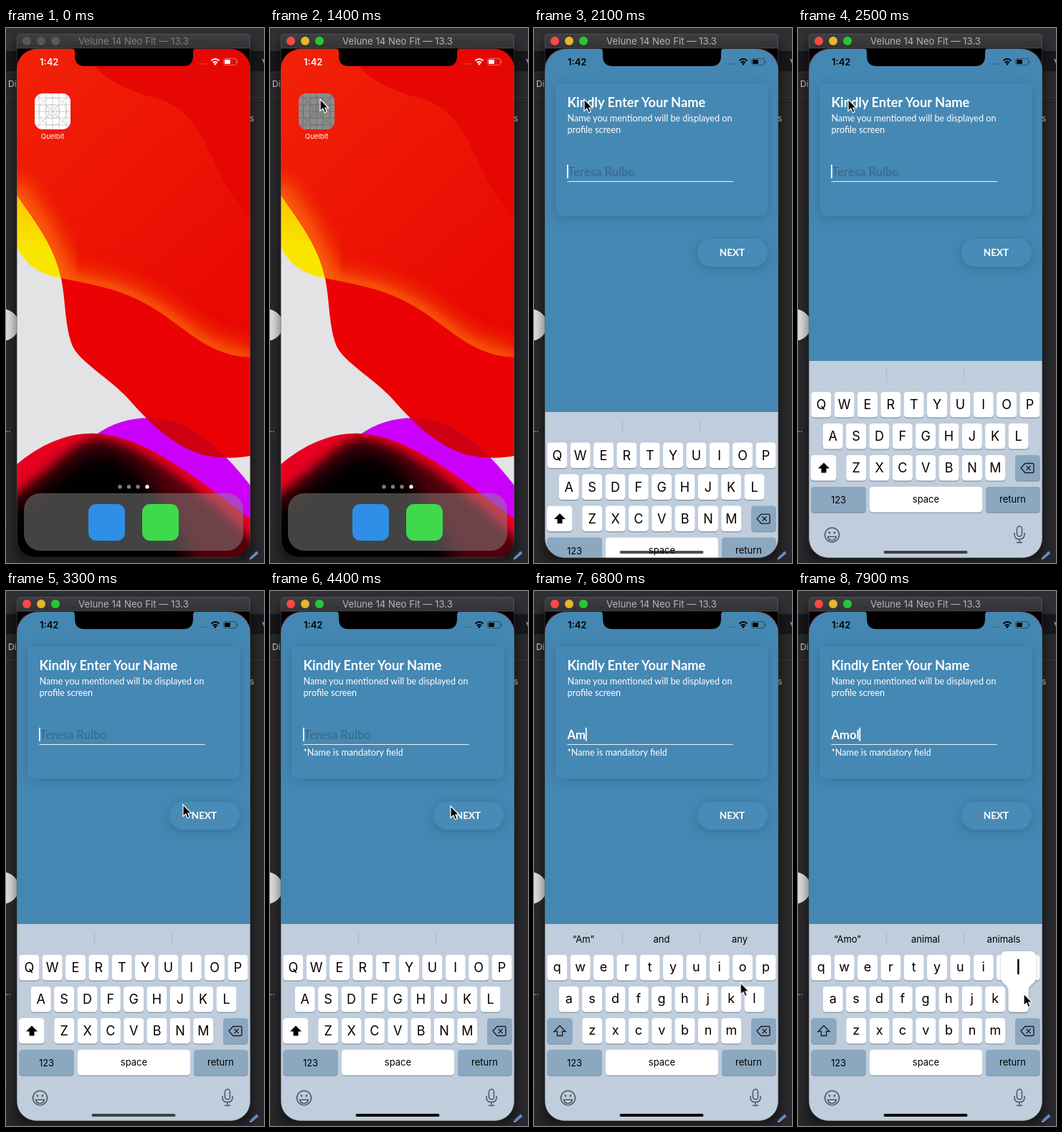
An HTML page for the animation above (8 s loop, 360 by 744 pixels).

```html
<!DOCTYPE html>
<html lang="en">
<head>
<meta charset="utf-8">
<title>Name entry</title>
<style>
html, body { margin: 0; width: 100%; height: 100%; overflow: hidden; background: #29292d; }
svg { display: block; width: 100vw; height: 100vh; }
text { font-family: Inter, sans-serif; }
.form text { font-family: Lato, sans-serif; fill: #fff; }
.mid { text-anchor: middle; }
.bold { font-weight: 700; }

.wall, .icons, .dim, .app, .form, .splash, .keyboard, .homebar, .pointer {
  animation: 8s linear infinite;
}
.wall { animation-name: wall; transform-origin: 178px 383px; }
.icons { animation-name: icons; }
.dim { animation-name: dim; }
.app { animation-name: launch; transform-origin: 15px 29px; }
.splash { animation-name: splash; }
.form { animation-name: form; }
.keyboard { animation-name: rise; }
.homebar { animation-name: homebar; }
.pointer { animation-name: point; animation-timing-function: ease-in-out; }

@keyframes wall {
  0%, 17.6% { filter: blur(0); transform: none; }
  20%, 100% { filter: blur(12px); transform: scale(1.12, 1.05); }
}
@keyframes icons { 0%, 17.6% { opacity: 1; } 19.6%, 100% { opacity: 0; } }
@keyframes dim { 0%, 17.6% { opacity: 0; } 20%, 100% { opacity: .55; } }
@keyframes launch {
  0%, 17.6% { opacity: 0; transform: translate(25px, 62px) scale(.153, .071); }
  18.2% { opacity: 1; }
  18.75% { opacity: 1; transform: translate(12px, 38px) scale(.6, .52); }
  20% { opacity: 1; transform: translate(2px, 16px) scale(.936, .898); }
  21.25% { opacity: 1; transform: translate(0, 4px) scale(.99, .98); }
  22.5%, 100% { opacity: 1; transform: none; }
}
@keyframes splash { 0%, 21.5% { opacity: 1; } 24%, 100% { opacity: 0; } }
@keyframes form { 0%, 21.5% { opacity: 0; } 24%, 100% { opacity: 1; } }
@keyframes rise {
  0%, 23.75% { transform: translateY(290px); }
  25% { transform: translateY(160px); }
  26.25% { transform: translateY(71px); }
  27.5% { transform: translateY(25px); }
  28.75% { transform: translateY(6px); }
  30%, 100% { transform: none; }
}
@keyframes homebar {
  0%, 21.25% { opacity: 0; }
  23.75%, 41.5% { opacity: .68; }
  47%, 100% { opacity: 1; }
}
@keyframes point {
  0%, 2% { transform: translate(372px, 700px); }
  13.5%, 33.5% { transform: translate(70px, 99px); }
  37.5%, 50% { transform: translate(247px, 297px); }
  54%, 57.7% { transform: translate(252px, 299px); }
  68%, 71.5% { transform: translate(51px, 567px); }
  78%, 82.6% { transform: translate(277px, 606px); }
  86.5%, 91.5% { transform: translate(293px, 518px); }
  96.5%, 100% { transform: translate(315px, 560px); }
}
</style>
</head>
<body>
<svg viewBox="0 0 360 744" preserveAspectRatio="none">
  <defs>
    <filter id="soft" x="-30%" y="-30%" width="160%" height="160%"><feGaussianBlur stdDeviation="7"/></filter>
    <filter id="wide" x="-30%" y="-30%" width="160%" height="160%"><feGaussianBlur stdDeviation="14"/></filter>
    <path id="sheet" d="M15 29V232C45 275 68 305 77 348C84 383 82 425 96 448C113 471 145 488 171 516C205 555 235 580 270 592C300 600 325 598 341 595V29Z"/>
    <path id="fold" d="M15 29V305C28 330 48 343 78 348C120 357 160 362 203 388C248 414 280 456 341 458V29Z"/>
    <path id="foldEdge" d="M15 305C28 330 48 343 78 348C120 357 160 362 203 388C248 414 280 456 345 458"/>
    <path id="swell" d="M125 566C160 540 205 537 240 549C280 565 312 600 341 636V740H125Z"/>
    <path id="hill" d="M15 607C50 577 90 562 126 564C195 568 265 625 341 683V740H15Z"/>
    <clipPath id="screen"><rect x="15" y="29" width="326" height="708" rx="28"/></clipPath>
    <clipPath id="inSheet"><use href="#sheet"/></clipPath>
    <clipPath id="inFold"><use href="#fold"/></clipPath>
    <clipPath id="inHill"><use href="#hill"/></clipPath>
    <clipPath id="inIcon"><rect x="40" y="91" width="50" height="50" rx="11"/></clipPath>
    <linearGradient id="bar" x2="0" y2="1"><stop stop-color="#3f3e41"/><stop offset="1" stop-color="#333235"/></linearGradient>
    <linearGradient id="yellow" x2="0" y2="1"><stop offset=".47" stop-color="#ffc400"/><stop offset=".65" stop-color="#f9e600"/></linearGradient>
    <linearGradient id="red" x2=".7" y2="1"><stop stop-color="#f22208"/><stop offset="1" stop-color="#e90802"/></linearGradient>
    <g id="status">
      <text x="47" y="51.5" font-size="13" font-weight="600" fill="currentColor">1:42</text>
      <g fill="currentColor" opacity=".25">
        <circle cx="268" cy="50" r="1.1"/><circle cx="272" cy="50" r="1.1"/><circle cx="276" cy="50" r="1.1"/><circle cx="280" cy="50" r="1.1"/>
      </g>
      <path d="M286.5 45.5Q292 40.5 297.5 45.5M289 48.2Q292 45.6 295 48.2" fill="none" stroke="currentColor" stroke-width="2"/>
      <path d="M290 49.6Q292 48 294 49.6L292 52Z" fill="currentColor"/>
      <rect x="303.5" y="42.5" width="18" height="9" rx="2.6" fill="none" stroke="currentColor" opacity=".4"/>
      <rect x="305" y="44" width="8" height="6" rx="1.2" fill="currentColor"/>
      <path d="M323 45.5v3" stroke="currentColor" opacity=".4"/>
    </g>
  </defs>

  <!-- Desktop behind the window -->
  <rect width="360" height="744" fill="#29292d"/>
  <rect width="360" height="32" fill="#303034"/>
  <rect y="32" width="360" height="28" fill="#18181b"/>
  <path d="M0 96.5H360" stroke="#3a3a3e"/>
  <path d="M357 42l3 2v6Z" fill="#9b7cf0"/>
  <g fill="#d8d8da" font-size="12">
    <text x="3" y="82">Di</text><text x="340" y="130">s</text>
    <text x="-4" y="562">...</text><text x="-2" y="690">:</text>
  </g>
  <circle cx="-4" cy="413" r="22" fill="#dededf"/>
  <path d="M342 737l9-8" stroke="#6f97d6" stroke-width="4"/>
  <path d="M340 738.5l2.5-1.5" stroke="#c5d3ea" stroke-width="2"/>
  <rect x="12" y="14" width="332" height="728" rx="16" opacity=".45" filter="url(#soft)"/>

  <!-- Window -->
  <path d="M15 28H341V709Q341 737 313 737H43Q15 737 15 709Z"/>
  <path d="M15.5 28V13Q15.5 8.5 20 8.5H336Q340.5 8.5 340.5 13V28Z" fill="url(#bar)" stroke="#555458" stroke-width=".8"/>
  <g id="idle">
    <g fill="#59585b"><circle cx="29" cy="18" r="6"/><circle cx="49" cy="18" r="6"/><circle cx="69" cy="18" r="6"/></g>
    <text class="mid" x="178" y="23" font-size="13.2" fill="#7f7e82">Velune 14 Neo Fit — 13.3</text>
  </g>
  <g id="active">
    <circle cx="29" cy="18" r="6" fill="#fb4a44"/><circle cx="49" cy="18" r="6" fill="#e4b62f"/><circle cx="69" cy="18" r="6" fill="#28c732"/>
    <text class="mid" x="178" y="23" font-size="13.2" fill="#b4b3b7">Velune 14 Neo Fit — 13.3</text>
  </g>

  <g clip-path="url(#screen)">
    <g class="wall">
      <rect x="15" y="29" width="326" height="708" fill="#e3e3e5"/>
      <use href="#swell" fill="#cb00fb"/>
      <use href="#fold" fill="url(#yellow)"/>
      <use href="#sheet" fill="#eb0205"/>
      <g clip-path="url(#inSheet)">
        <use href="#swell" fill="#cf0014"/>
        <g clip-path="url(#inFold)">
          <use href="#fold" fill="url(#red)"/>
          <g fill="none" stroke="#ff7a0c">
            <use href="#foldEdge" stroke-width="30" opacity=".6" filter="url(#wide)"/>
            <use href="#foldEdge" stroke-width="7" opacity=".8" filter="url(#soft)"/>
            <path d="M5 218L15 232C45 275 68 305 77 348" stroke-width="34" opacity=".8" filter="url(#wide)"/>
          </g>
          <path d="M105 29C130 70 165 86 217 100C286 123 285 215 341 260V29Z" fill="#e60703"/>
        </g>
      </g>
      <use href="#hill" fill="#e80020"/>
      <g clip-path="url(#inHill)">
        <path d="M-20 668C50 636 85 578 126 570C195 580 265 640 350 716V770H-20Z" opacity=".65" filter="url(#soft)"/>
        <path d="M-20 680C50 650 85 594 130 586C185 592 215 640 270 770H-20Z" filter="url(#wide)"/>
      </g>
    </g>
    <rect class="dim" x="15" y="29" width="326" height="708"/>

    <g class="icons">
      <use href="#status" color="#fff"/>
      <rect x="40" y="91" width="50" height="50" rx="11" fill="#fff"/>
      <g clip-path="url(#inIcon)" fill="none" stroke="#b4b4b6" stroke-width=".6">
        <path d="M40 91l50 50M90 91l-50 50M65 91v50M40 116h50M46 91v50M84 91v50M40 97h50M40 135h50M56 91v50M74 91v50M40 107h50M40 125h50"/>
        <circle cx="65" cy="116" r="6"/><circle cx="65" cy="116" r="10"/><circle cx="65" cy="116" r="19"/>
      </g>
      <rect id="pressed" x="40" y="91" width="50" height="50" rx="11" opacity=".45"/>
      <text class="mid" x="65" y="154" font-size="9.6" fill="#fff">Quelbit</text>
      <g fill="#fff">
        <g opacity=".5"><circle cx="159" cy="638" r="2.7"/><circle cx="171.5" cy="638" r="2.7"/><circle cx="184" cy="638" r="2.7"/></g>
        <circle cx="197" cy="638" r="2.7"/>
      </g>
      <rect x="25" y="647" width="306" height="80" rx="23" fill="#8d8d8d" opacity=".48"/>
      <rect x="115" y="662" width="51" height="51" rx="11" fill="#2f8fe6"/>
      <rect x="190" y="662" width="51" height="51" rx="11" fill="#3fd94c"/>
    </g>

    <g class="app">
      <rect x="15" y="29" width="326" height="708" rx="30" fill="#4487b2"/>
      <rect class="splash" x="15" y="29" width="326" height="708" rx="30" fill="#549bbe"/>
      <use href="#status" color="#000"/>
      <g class="form">
        <rect x="30" y="79" width="296" height="184" rx="9" fill="#255f88" opacity=".5" filter="url(#soft)"/>
        <rect x="30" y="77" width="296" height="184" rx="8" fill="#4588b3"/>
        <rect x="228" y="296" width="98" height="39" rx="19.5" fill="#255f88" opacity=".5" filter="url(#soft)"/>
        <rect x="228" y="293" width="98" height="39" rx="19.5" fill="#488bb6"/>
        <text class="bold" x="46.5" y="110" font-size="18.3">Kindly Enter Your Name</text>
        <text x="46.5" y="130" font-size="12.6">Name you mentioned will be displayed on</text>
        <text x="46.5" y="146" font-size="12.6">profile screen</text>
        <text class="bold mid" x="276.5" y="317" font-size="13.5">NEXT</text>
        <path d="M46.5 213.5H278" stroke="#e8f0f5"/>
        <text id="hint" class="bold" x="47" y="206" font-size="16.6" style="fill:#3a6f93">Teresa Rulbo</text>
        <rect id="caret" x="46" y="190" width="1.8" height="19" fill="#fff"/>
        <g id="typed"></g>
        <text id="error" x="46.5" y="229" font-size="12.6">*Name is mandatory field</text>
      </g>
    </g>

    <g class="keyboard">
      <rect x="15" y="463" width="326" height="275" fill="#bfcddc"/>
      <path d="M123.5 473v19M232 473v19" stroke="#a8b7c7"/>
      <g id="suggestions"></g>
      <g id="keys"></g>
      <g fill="none" stroke="#4c565f" stroke-width="1.5">
        <circle cx="47.5" cy="705" r="10"/><path d="M41.5 707.5h12q-1.5 5-6 5t-6-5Z"/>
        <rect x="305.5" y="693" width="7" height="14" rx="3.5"/><path d="M302 702v2q0 7 7 7t7-7v-2M309 711v4M305 715.5h8"/>
      </g>
      <circle cx="44" cy="702" r="1.4" fill="#4c565f"/><circle cx="51" cy="702" r="1.4" fill="#4c565f"/>
      <g id="popups"></g>
    </g>
    <rect class="homebar" x="119.5" y="727" width="117" height="4" rx="2"/>
  </g>

  <path d="M93 28.5Q96 29 96 34V39Q96 53 110 53H247Q261 53 261 39V34Q261 29 264 28.5Z"/>
  <path d="M15.5 28V709Q15.5 736.5 43 736.5H313Q340.5 736.5 340.5 709V28" fill="none" stroke="#5a595d" stroke-width=".7" opacity=".7"/>

  <g class="pointer">
    <path d="M0 0V16.5L3.8 13L6.3 18.8L9.2 17.5L6.7 12H11.7Z" stroke="#fff" stroke-width="1.2"/>
  </g>
</svg>
<script>
const LOOP = 8000;
const $ = id => document.getElementById(id);
const sheet = document.head.appendChild(document.createElement('style'));

// Makes an element visible only during the given [from, to] spans, in ms.
let ruleCount = 0;
function show(el, ...spans) {
  const name = 'show' + ruleCount++;
  const stops = spans.map(([from, to]) =>
    `${from / LOOP * 100}%{visibility:visible}` +
    (to < LOOP ? `${to / LOOP * 100}%{visibility:hidden}` : '')).join('');
  const start = spans[0][0] > 0 ? '0%{visibility:hidden}' : '';
  const end = spans.at(-1)[1] < LOOP ? 'hidden' : 'visible';
  sheet.append(`@keyframes ${name}{${start}${stops}100%{visibility:${end}}}`);
  el.style.animation = `${name} ${LOOP}ms step-end infinite`;
}

function add(parent, tag, attrs, text = '') {
  const el = document.createElementNS('http://www.w3.org/2000/svg', tag);
  for (const key in attrs) el.setAttribute(key, attrs[key]);
  el.textContent = text;
  return parent.appendChild(el);
}
const label = (parent, x, y, size, text) =>
  add(parent, 'text', { class: 'mid', x, y, 'font-size': size }, text);

const FIRST_LETTER = 5700;
const GRAY = '#8ba8c0';
const caps = add($('keys'), 'g', {});
const upper = add($('keys'), 'g', {});
const lower = add($('keys'), 'g', {});
const keyAt = {};

function keyCap(parent, x, y, width, fill) {
  add(parent, 'rect', { x, y: y + 1.2, width, height: 35.5, rx: 4.5, fill: '#8592a1' });
  add(parent, 'rect', { x, y, width, height: 35.5, rx: 4.5, fill });
}

[['qwertyuiop', 32.3, 506], ['asdfghjkl', 48.7, 550], ['zxcvbnm', 81.2, 594]].forEach(([row, x0, y]) => {
  [...row].forEach((letter, i) => {
    const x = x0 + i * 32.35;
    keyAt[letter] = { x, y };
    keyCap(caps, x - 14, y, 28, '#fff');
    label(upper, x, y + 24, 18, letter.toUpperCase());
    label(lower, x, y + 23, 18, letter);
  });
});
keyCap(caps, 18, 594, 35.5, GRAY);
keyCap(caps, 303, 594, 35, GRAY);
keyCap(caps, 18, 638, 77, GRAY);
keyCap(caps, 100, 638, 157, '#fff');
keyCap(caps, 262, 638, 76, GRAY);
label(caps, 56.5, 661, 13, '123');
label(caps, 178.5, 660, 13, 'space');
label(caps, 299.5, 660, 13, 'return');
const outline = { fill: 'none', stroke: '#151a1e', 'stroke-width': 1.3 };
add(caps, 'path', {
  d: 'M311 612L317 605.5H327Q329 605.5 329 607.5V616.5Q329 618.5 327 618.5H317ZM318.5 609l6 6m0-6l-6 6',
  ...outline
});
const arrow = 'M36 604.5L28 612.5H32.5V618.5H39.5V612.5H44Z';
keyCap(upper, 18, 594, 35.5, '#fff');
add(upper, 'path', { d: arrow });
add(lower, 'path', { d: arrow, ...outline });
show(upper, [0, FIRST_LETTER]);
show(lower, [FIRST_LETTER, LOOP]);

function popup(char, from, to) {
  const { x, y } = keyAt[char.toLowerCase()];
  const group = add($('popups'), 'g', { transform: `translate(${x} ${y})` });
  add(group, 'path', {
    d: 'M-17-49H17Q24.5-49 24.5-41V-13C24.5-3 14-4 14 6V31Q14 35.5 9.5 35.5H-9.5Q-14 35.5-14 31V6C-14-4-24.5-3-24.5-13V-41Q-24.5-49-17-49Z',
    fill: '#fff', style: 'filter:drop-shadow(0 1px 1.5px #66778888)'
  });
  label(group, 0, -17, 28, char);
  show(group, [from, to]);
}
popup('A', 5500, 5700);
popup('m', 6300, 6500);
popup('o', 7000, 7200);
popup('l', 7800, LOOP);

function typed(text, from, to) {
  const group = add($('typed'), 'g', {});
  const word = add(group, 'text', { class: 'bold', x: 46.5, y: 206, 'font-size': 16.6 }, text);
  add(group, 'rect', { x: 46.5 + word.getComputedTextLength(), y: 190, width: 1.8, height: 19, fill: '#fff' });
  show(group, [from, to]);
}
typed('A', FIRST_LETTER, 6500);
typed('Am', 6500, 7100);
typed('Amo', 7100, 7900);
typed('Amol', 7900, LOOP);

function suggest(words, from, to) {
  const group = add($('suggestions'), 'g', {});
  words.forEach((word, i) => label(group, 69 + i * 109, 488.5, 13, word));
  show(group, [from, to]);
}
suggest(['“A”', 'and', 'are'], 5800, 6500);
suggest(['“Am”', 'and', 'any'], 6500, 7200);
suggest(['“Amo”', 'animal', 'animals'], 7200, LOOP);

show($('idle'), [0, 1200]);
show($('active'), [1200, LOOP]);
show($('pressed'), [1300, 1900]);
show($('hint'), [0, FIRST_LETTER]);
show($('error'), [4300, LOOP]);
show($('caret'), [2000, 2650], [3000, 3650], [4000, 4650], [5000, FIRST_LETTER]);
</script>
</body>
</html>
```
